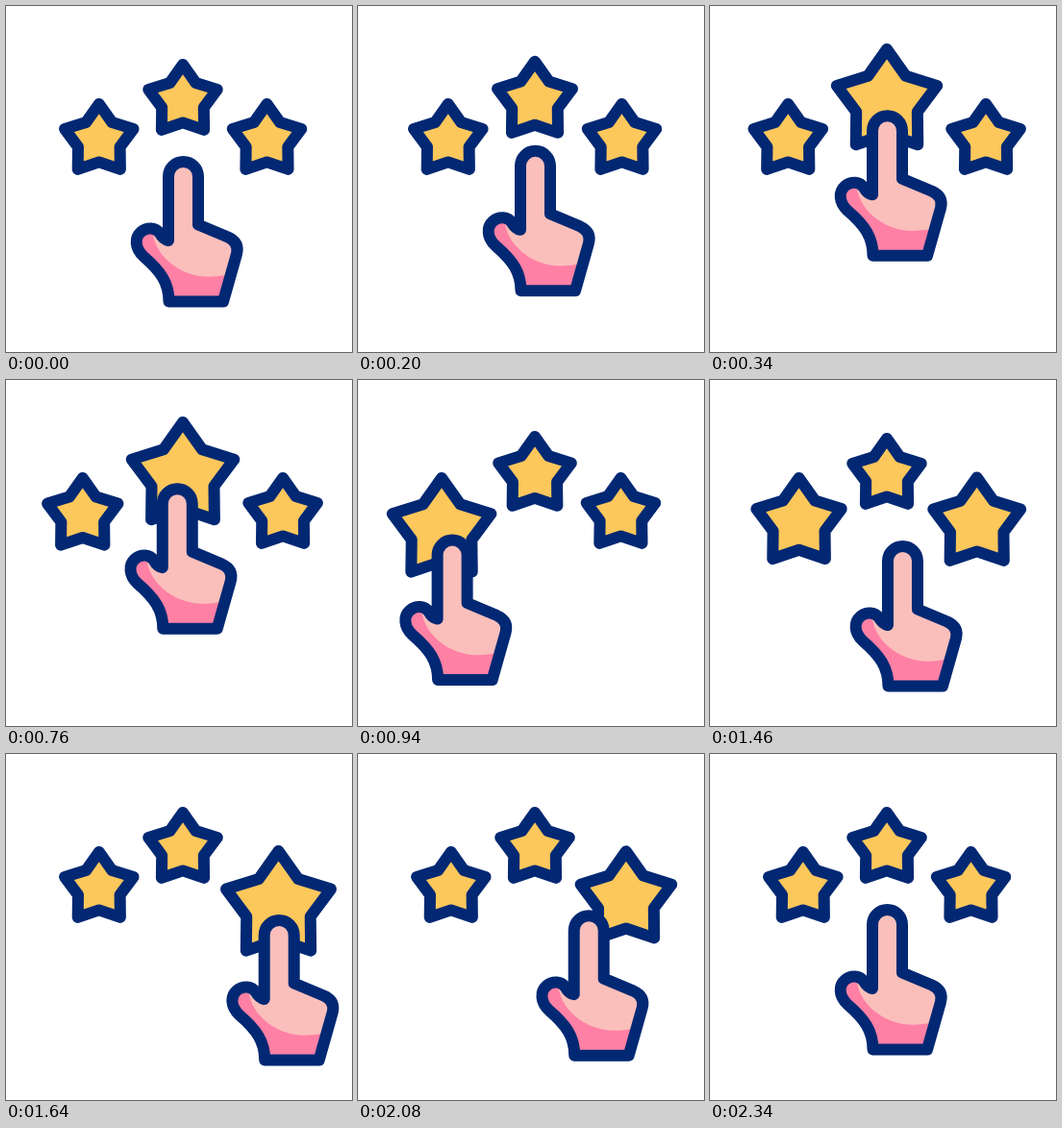
These frames come from a looping animation (360 by 360 pixels, 2400 ms). An HTML page:

```html
<!DOCTYPE html>
<html lang="en">
<head>
<meta charset="utf-8">
<title>Star rating</title>
<style>
  html, body { margin: 0; width: 100%; height: 100%; overflow: hidden; background: #fff; }
  svg { display: block; width: 100%; height: 100%; }
  .line { stroke: #022873; stroke-width: 12; stroke-linejoin: round; stroke-linecap: round; }
</style>
</head>
<body>
<svg viewBox="0 0 360 360">
  <defs>
    <path id="palm" d="M169 244V177.500a15.500 15.500 0 0 1 31 0V227.500L231 240.500Q243 246 240 258L226 307.500H169.500C169.500 288 161 276 143 260.500C134 252 133.500 241 140.500 235C147 229.500 156 230.500 160 236.500Q163.500 243 169 244Z"/>
    <clipPath id="inside"><use href="#palm"/></clipPath>
  </defs>
  <g class="line" fill="#fcc75b">
    <polygon class="star"/>
    <polygon class="star"/>
    <polygon class="star"/>
  </g>
  <g id="hand">
    <use href="#palm" fill="#fabfbb"/>
    <path clip-path="url(#inside)" fill="#ff80a5" d="M153 225C148 254 178 284 216 281.500Q226 281 240 277V315H120V225Z"/>
    <use href="#palm" class="line" fill="none"/>
  </g>
</svg>
<script>
  const LOOP = 2400, STEP = 20, START = 100, BEAT = 600;
  const stars = document.querySelectorAll('.star');
  const hand = document.getElementById('hand');

  // Resting stars, left to right: x, y, radius
  const small = [[96.8, 139.5, 37.6], [184, 98.5, 37.6], [271.5, 139.5, 37.6]];
  const grow = (i, big) => small.map((s, j) => j === i ? big : s);
  const rest = { hand: [0, 0], stars: small };
  const middle = {
    hand: [0, -53],
    stars: [[79.3, 139.5, 37.6], [184, 100, 57], [289, 139.5, 37.6]]
  };
  const left = { hand: [-96, 11], stars: grow(0, [88, 158, 56]) };
  const right = { hand: [99.7, 11], stars: grow(2, [283.5, 158.3, 57.3]) };
  const poses = [rest, middle, left, right, rest];
  const spans = [340, 340, 340, 440];

  // Cubic Bezier (a, 0, b, 1), solved by bisection
  function ease(x, a, b) {
    let lo = 0, hi = 1, u;
    for (let i = 0; i < 24; i++) {
      u = (lo + hi) / 2;
      const v = 1 - u;
      if (3 * v * u * (a * v + b * u) + u ** 3 < x) lo = u; else hi = u;
    }
    return u * u * (3 - 2 * u);
  }

  const mix = (a, b, p) => a.map((v, i) => v + (b[i] - v) * p);

  function starPoints([x, y, r]) {
    return Array.from({ length: 10 }, (_, i) => {
      const d = i % 2 ? r * 0.61 : r, a = i * Math.PI / 5;
      return [x + d * Math.sin(a), y - d * Math.cos(a)].map(v => v.toFixed(2));
    }).join(' ');
  }

  function draw(now) {
    const t = Math.floor(now % LOOP / STEP) * STEP;
    const k = Math.max(0, Math.floor((t - START) / BEAT));
    const x = Math.min(1, Math.max(0, (t - START - k * BEAT) / spans[k]));
    const from = poses[k], to = poses[k + 1];
    const grown = ease(x, 0.5, 0.4), moved = ease(x, 0.45, 0.38);
    stars.forEach((s, i) =>
      s.setAttribute('points', starPoints(mix(from.stars[i], to.stars[i], grown))));
    hand.setAttribute('transform', `translate(${mix(from.hand, to.hand, moved)})`);
  }

  let begin;
  function tick(now) {
    begin ??= now;
    draw(now - begin);
    requestAnimationFrame(tick);
  }
  draw(0);
  requestAnimationFrame(tick);
</script>
</body>
</html>
```
